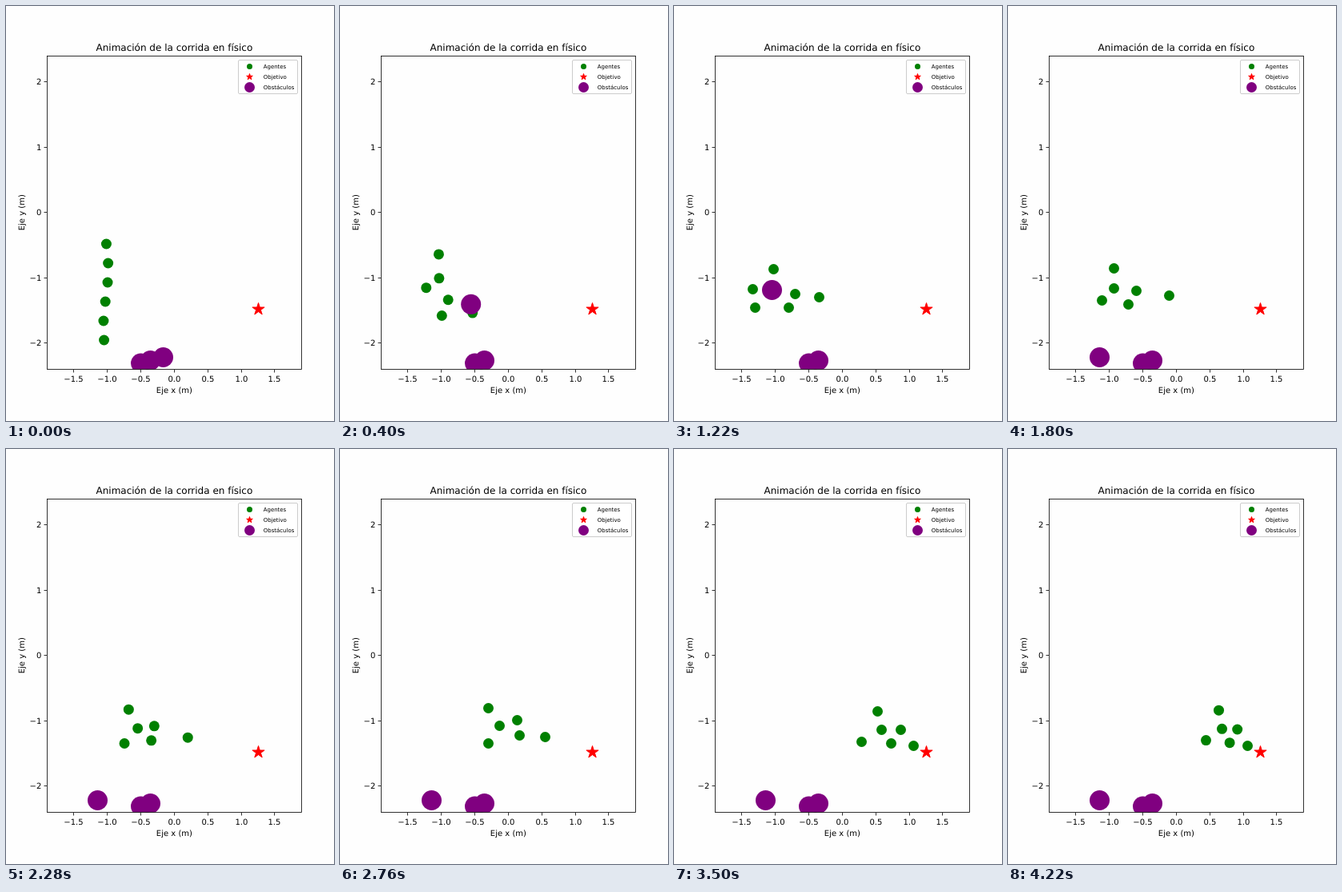
These frames come from a looping animation (410 by 518 pixels, 4240 ms). An HTML page:

```html
<!DOCTYPE html>
<html lang="es">
<head>
<meta charset="utf-8">
<style>
  html, body { margin: 0; width: 100%; height: 100%; overflow: hidden; background: #fefefe; }
  svg { display: block; font: 10px "DejaVu Sans", sans-serif; text-rendering: geometricPrecision; }
  .mid { text-anchor: middle; }
  .end { text-anchor: end; }
</style>
</head>
<body>
<svg id="plot" width="410" height="518" viewBox="0 0 410 518">
  <clipPath id="area"><rect x="51.5" y="62.5" width="318" height="391"/></clipPath>
  <text class="mid" x="210.4" y="56" font-size="12">Animación de la corrida en físico</text>
  <text class="mid" x="210.4" y="483">Eje x (m)</text>
  <text class="mid" transform="translate(23 257.7) rotate(-90)">Eje y (m)</text>
  <g id="dots" clip-path="url(#area)"></g>
  <g id="axes" fill="none" stroke="#000" stroke-width=".8"><rect x="51.5" y="62.5" width="318" height="391"/></g>
  <rect x="290.5" y="67.5" width="74" height="42" rx="1.5" fill="#fff" fill-opacity=".8" stroke="#ccc"/>
  <g id="legend" font-size="6.94"></g>
</svg>
<script>
const LOOP = 4240, STEP = 20;
const $ = id => document.getElementById(id);
const dots = $('dots'), axes = $('axes'), legend = $('legend'), plot = $('plot');

function add(parent, tag, attrs, text = '') {
  const el = document.createElementNS('http://www.w3.org/2000/svg', tag);
  for (const key in attrs) el.setAttribute(key, attrs[key]);
  el.textContent = text;
  return parent.appendChild(el);
}
const disc = (parent, fill, r, cx, cy) => add(parent, 'circle', { fill, r, cx, cy });

function star(parent, cx, cy, r) {
  const points = Array.from({ length: 10 }, (_, i) => {
    const a = i * Math.PI / 5, d = i % 2 ? r * 0.382 : r;
    return [cx + d * Math.sin(a), cy - d * Math.cos(a)];
  });
  add(parent, 'polygon', { points, fill: 'red', stroke: 'red', 'stroke-linejoin': 'bevel' });
}

// Axis ticks and labels
const label = (v, digits) => (v < 0 ? '\u2212' : '') + Math.abs(v).toFixed(digits);
for (let v = -1.5; v <= 1.5; v += 0.5) {
  const x = Math.floor(210.4 + v * 83.7);
  add(axes, 'path', { d: `M${x + .5} 454v3.5` });
  add(plot, 'text', { class: 'mid', x: x + .4, y: 469 }, label(v, 1));
}
for (let v = -2; v <= 2; v++) {
  const y = Math.floor(257.9 - v * 81.5);
  add(axes, 'path', { d: `M51 ${y + .5}h-3.5` });
  add(plot, 'text', { class: 'end', x: 44.3, y: y + 4 }, label(v, 0));
}

['Agentes', 'Objetivo', 'Obstáculos'].forEach((name, i) =>
  add(legend, 'text', { x: 321.8, y: 78 + 13 * i }, name));
disc(legend, 'green', 3.5, 304.5, 75.5);
star(legend, 304.5, 88.5, 4);
disc(legend, 'purple', 6.5, 304.5, 101.5);

// Monotone cubic through the values V at times T
function curve(T, V, t) {
  const last = T.length - 1;
  if (t >= T[last]) return V[last];
  const slope = i => (V[i + 1] - V[i]) / (T[i + 1] - T[i]);
  const tangent = i => {
    if (i === 0) return slope(0);
    if (i === last) return slope(last - 1);
    const a = slope(i - 1), b = slope(i);
    return a * b > 0 ? 2 * a * b / (a + b) : 0;
  };
  const i = T.findIndex(end => end > t) - 1;
  const h = T[i + 1] - T[i], u = (t - T[i]) / h, w = 1 - u;
  return V[i] * w * w * (1 + 2 * u) + V[i + 1] * u * u * (3 - 2 * u)
    + h * u * w * (tangent(i) * w - tangent(i + 1) * u);
}

const movers = [];
function mover(fill, r, times, path) {
  const [xs, ys] = [0, 1].map(k => path.map(p => p[k]));
  movers.push({ el: disc(dots, fill, r, 0, 0), times, xs, ys });
}

// Agents leave a wavy column, pass a few waypoints and close up on the leader
const times = [0, 740, 1220, 1800, 2760, 3500, 4220];
const column = i => [124.8 + 3 * Math.cos((i - 1.3) * Math.PI / 3), 297 + 24 * i];
function closeUp([x, y]) {
  const gap = 299.5 - x;
  return [x + 0.2 * gap, y - 0.03 * gap];
}
[
  [[122.5, 319.5], [124.5, 328.5], [132.5, 327.5], [185.5, 323.5], [254.5, 327.5]],
  [[119.5, 350.5], [98.5, 353.5], [132.5, 352.5], [199.5, 345.5], [259.5, 350.5]],
  [[98.5, 358.5], [101.5, 376.5], [117.5, 367.5], [185.5, 367.5], [234.5, 365.5]],
  [[143.5, 364.5], [151.5, 359.5], [160.5, 355.5], [221.5, 338.5], [283.5, 350.5]],
  [[132.5, 381.5], [143.5, 376.5], [150.5, 372.5], [224.5, 357.5], [271.5, 367.5]],
  [[186.5, 365.5], [181.5, 363.5], [201.5, 361.5], [256.5, 359.5], [299.5, 370.5]],
].forEach((way, i) =>
  mover('green', 6.5, times, [column(i), ...way, closeUp(way[4])]));

disc(dots, 'purple', 12.5, 168.5, 446);
disc(dots, 'purple', 12.5, 180.5, 442.5);
mover('purple', 12.5, [0, 740, 1220, 1620],
  [[196.5, 438.5], [140.5, 340.5], [122.5, 354.5], [114.5, 438.5]]);
star(dots, 315.5, 378.5, 8);

function draw(now) {
  const t = Math.floor(now % LOOP / STEP) * STEP;
  for (const { el, times, xs, ys } of movers) {
    el.setAttribute('cx', curve(times, xs, t));
    el.setAttribute('cy', curve(times, ys, t));
  }
}
let start;
function tick(now) {
  start ??= now;
  draw(now - start);
  requestAnimationFrame(tick);
}
draw(0);
requestAnimationFrame(tick);
</script>
</body>
</html>
```
